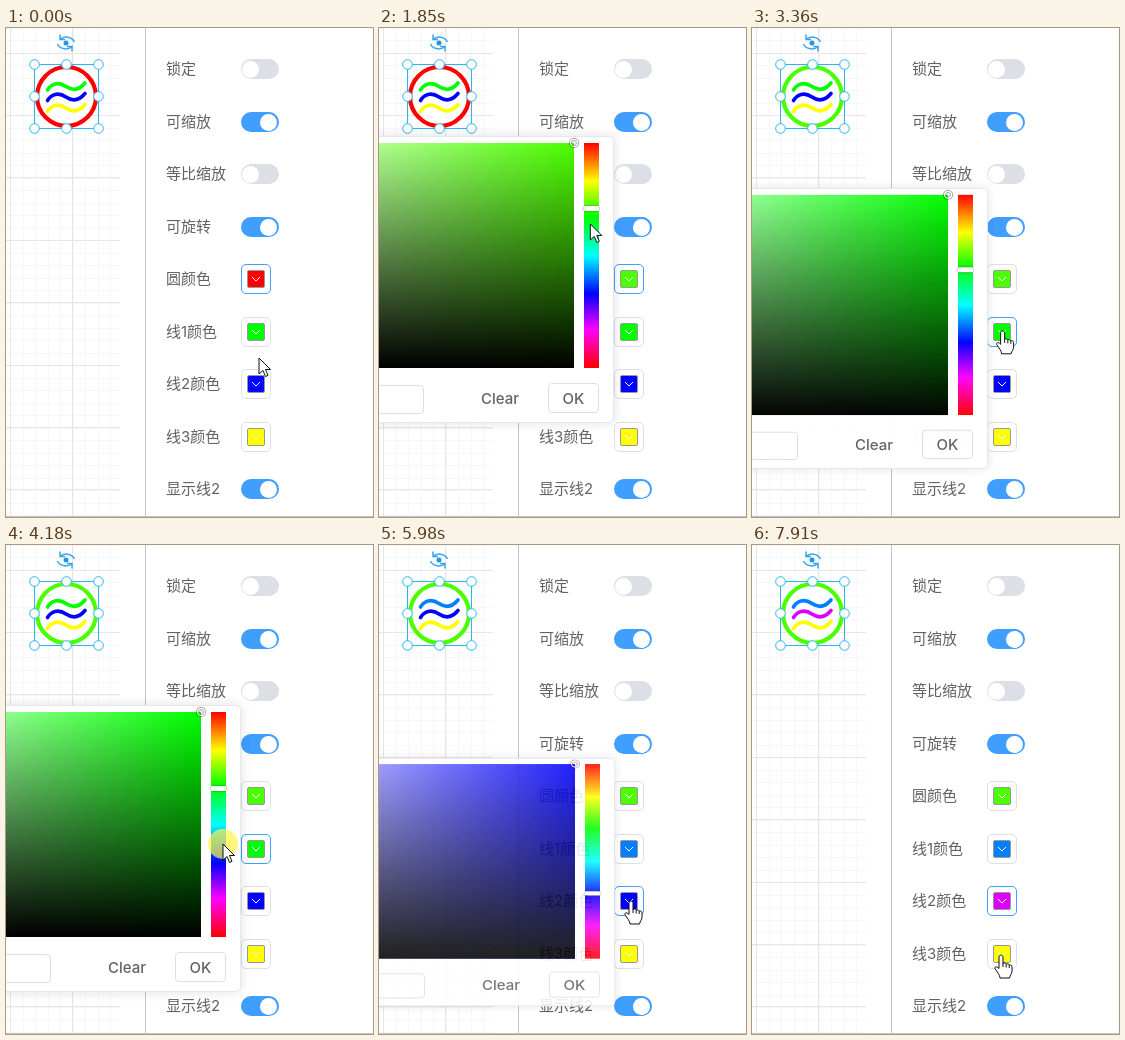
An HTML page for the animation above (8 s loop, 367 px wide and 489 px high).

```html
<!DOCTYPE html>
<html lang="zh">
<head>
<meta charset="utf-8">
<style>
  html, body { margin: 0; width: 100%; height: 100%; overflow: hidden; background: #fff; }
  #stage { position: relative; width: 367px; height: 489px; overflow: hidden;
    font: 15px/20px Inter, "Noto Sans CJK SC", "Noto Sans CJK", sans-serif; color: #606266; }
  #stage * { box-sizing: border-box; position: absolute; }
  svg { left: 0; top: 0; overflow: visible; }
  svg * { position: static; }
  .label { left: 160px; white-space: nowrap; }
  .switch { left: 235px; width: 38px; height: 20px; border-radius: 10px; background: #dcdfe6; }
  .switch::after { content: ""; position: absolute; left: 1px; top: 1.5px; width: 17px; height: 17px; border-radius: 50%; background: #fff; }
  .switch.on { background: #409eff; }
  .switch.on::after { left: 19px; }
  .swatch { left: 235px; width: 30px; height: 30px; border: 1px solid #dcdfe6; border-radius: 5px; background: #fff; }
  .swatch.focus { border-color: #409eff; }
  .swatch.ring { box-shadow: 0 0 0 1px #fff, 0 0 0 3px #409eff; }
  .swatch i { left: 5px; top: 5px; width: 18px; height: 18px; border: 1px solid #999; border-radius: 2px; }
  .swatch svg { left: 5px; top: 5px; }
  .popup { left: -161px; width: 396px; height: 287px; border: 1px solid #e4e7ed; border-radius: 5px;
    background: #fff; box-shadow: 0 0 12px rgba(0,0,0,.12); transform-origin: top; }
  .popup > * { margin: -1px; }
  .sv { left: 6px; top: 7px; width: 350px; height: 225px; }
  .dot { left: 352px; top: 3px; width: 8px; height: 8px; border: 1.5px solid #fff; border-radius: 50%;
    box-shadow: 0 0 1px 1px #0006, inset 0 0 1px 1px #0006; }
  .hue { left: 366px; top: 7px; width: 15px; height: 225px;
    background: linear-gradient(#f00, #ff0 17%, #0f0 33%, #0ff 50%, #00f 67%, #f0f 83%, #f00); }
  .thumb { left: 366px; width: 15px; height: 5px; background: #fff; border-radius: 1px; box-shadow: 0 0 2px #0009; }
  .input { left: 7px; top: 249px; width: 199px; height: 29px; border: 1px solid #dcdfe6; border-radius: 4px; }
  .clear, .ok { top: 247px; height: 30px; line-height: 32px; text-align: center; font-weight: 500; }
  .clear { left: 252px; width: 60px; }
  .ok { left: 330px; width: 51px; border: 1px solid #dcdfe6; border-radius: 4px; line-height: 30px; }
  .ok.hover { color: #409eff; border-color: #409eff; }
</style>
</head>
<body>
<div id="stage"></div>
<script>
const LOOP = 8000, SVG = 'http://www.w3.org/2000/svg';
const stage = document.getElementById('stage');

const rows = [
  ['锁定', false], ['可缩放', true], ['等比缩放', false], ['可旋转', true],
  ['圆颜色', 'red'], ['线1颜色', '#0f0'], ['线2颜色', '#00f'], ['线3颜色', '#ff0'], ['显示线2', true]
];
// Each picker opens, gets a new hue, and is confirmed with OK.
const pickers = [
  { top: 108, open: 663, pick: 1650, ok: 2430, from: 0, to: 102 },
  { top: 160, open: 3200, pick: 4245, ok: 5040, from: 120, to: 210 },
  { top: 213, open: 5882, pick: 6875, ok: 7620, from: 240, to: 292 }
];
const presses = [[570, 650], [1580, 1680], [2330, 2430], [3090, 3190], [4170, 4270],
  [4960, 5040], [5770, 5870], [6800, 6900], [7490, 7620]];
// time, x, y
const path = [
  [0, 253, 330], [520, 255, 250], [900, 255, 250], [1450, 213, 179], [1750, 213, 179],
  [2300, 194, 370], [2440, 194, 370], [2820, 264, 318], [3080, 252, 304], [3280, 252, 304],
  [3960, 217, 299], [4400, 217, 299], [4940, 194, 422], [5060, 194, 422], [5720, 252, 357],
  [6020, 252, 357], [6660, 210, 402], [7000, 210, 402], [7480, 194, 476], [7630, 194, 476],
  [7890, 249, 411], [8000, 249, 411]
];

function add(parent, cls, html = '', style = '') {
  const el = document.createElement('div');
  el.className = cls;
  el.innerHTML = html;
  el.style.cssText = style;
  parent.append(el);
  return el;
}
function addSvg(html) {
  const el = document.createElementNS(SVG, 'svg');
  el.setAttribute('width', 367);
  el.setAttribute('height', 489);
  el.innerHTML = html;
  stage.append(el);
  return el;
}

function gridLines(step, color) {
  let d = '';
  for (let x = 4.5; x < 114; x += step) d += `M${Math.floor(x) + .5} 0V488`;
  for (let y = 25 % step; y < 488; y += step) d += `M0 ${Math.floor(y) + .5}H114`;
  return `<path d="${d}" stroke="${color}"/>`;
}
const wave = (y, color) =>
  `<path class="part" d="M41.5 ${y}C45 ${y - 6} 52 ${y - 9} 60 ${y - 3.5}S74 ${y - 1} 79 ${y - 7}" stroke="${color}" stroke-width="3.6" stroke-linecap="round"/>`;
const handles = [28.5, 60.5, 92.5].flatMap(x => [36.5, 68.5, 100.5].map(y =>
  x === 60.5 && y === 68.5 ? '' : `<circle cx="${x}" cy="${y}" r="4.8" fill="#fff" stroke="#29b6f2"/>`)).join('');
const turn = '<path d="M54 6.5V11.5H59M54 11.5C58 7.5 66 8.5 68.5 14"/>';

const scene = addSvg(`<g fill="none">
  ${gridLines(12.5, '#f7f7f7')}${gridLines(62.4, '#e6e6e6')}
  <path d="M139.5 0V488M0 488.5H367" stroke="#c6c6c6"/>
  <circle class="part" cx="60.5" cy="68.5" r="29.5" fill="#fff" stroke="red" stroke-width="4.2"/>
  ${wave(62, '#0f0')}${wave(72.5, '#00f')}${wave(83.5, '#ff0')}
  <path d="M28.5 36.5H92.5V100.5H28.5Z" stroke="#29b6f2"/>${handles}
  <g stroke="#3aa5ee" stroke-width="1.5">${turn}<g transform="rotate(180 60 15)">${turn}</g></g>
  <circle cx="60" cy="15" r="2.5" fill="#1e96ea"/></g>`);
const parts = scene.querySelectorAll('.part');

const swatches = [];
rows.forEach(([text, value], i) => {
  const y = 41 + i * 52.5;
  add(stage, 'label', text, `top:${y - 10}px`);
  if (typeof value === 'boolean') {
    add(stage, value ? 'switch on' : 'switch', '', `top:${Math.round(y - 10)}px`);
  } else {
    swatches.push(add(stage, 'swatch', `<i style="background:${value}"></i>
      <svg width="18" height="18"><path d="M5 7L9 11L13 7" fill="none" stroke="#fff"/></svg>`,
      `top:${Math.round(y - 15)}px`));
  }
});

for (const p of pickers) {
  p.el = add(stage, 'popup', '', `top:${p.top}px`);
  p.sv = add(p.el, 'sv');
  add(p.el, 'dot');
  add(p.el, 'hue');
  p.thumb = add(p.el, 'thumb');
  add(p.el, 'input');
  add(p.el, 'clear', 'Clear');
  p.button = add(p.el, 'ok', 'OK');
}

const pointer = addSvg(`<circle r="15" fill="#fff545" fill-opacity=".7"/>
  <g fill="#fff" stroke="#111" stroke-linejoin="round">
  <path d="M0 0V16L4 12.5L6.5 18.5L9 17.4L6.5 11.5H11.5Z"/>
  <path d="M-2 1C-2-1.5 2-1.5 2 1V8C2 6.5 5 6.5 5.2 8.5C6 7.4 8 7.6 8.2 9.3C9 8.4 11 9 11 10.8V15C11 18 9 19 8.5 22H-1C-1 19-4 16-6 12.5C-6.5 10.5-4 10-2 12.5ZM2 8V11M5.2 8.5V11.5M8.2 9.3V12"/></g>`);
const halo = pointer.querySelector('circle');
const [arrow, hand] = pointer.querySelectorAll('path');

const clamp = v => Math.min(1, Math.max(0, v));
const easeOut = v => 1 - (1 - clamp(v)) ** 5;
const smooth = v => v * v * (3 - 2 * v);
const show = (el, on) => { el.style.display = on ? '' : 'none'; };
const hsl = h => `hsl(${h} 100% 50%)`;

function pointerAt(t) {
  const i = Math.max(1, path.findIndex(p => p[0] > t));
  const [t0, x0, y0] = path[i - 1], [t1, x1, y1] = path[i];
  const k = smooth((t - t0) / (t1 - t0));
  return [x0 + (x1 - x0) * k, y0 + (y1 - y0) * k];
}

function render(t) {
  const [x, y] = pointerAt(t);
  let over = swatches.some(s => x > 235 && x < 265 && y > s.offsetTop && y < s.offsetTop + 28);
  const focus = t < pickers[1].open ? 0 : t < pickers[2].open ? 1 : 2;
  swatches.forEach((s, i) => s.classList.toggle('focus', i === focus));
  swatches[0].classList.toggle('ring', t > pickers[0].open && t < 1050);

  pickers.forEach((p, i) => {
    const scale = t < p.ok ? easeOut((t - p.open) / 300) : 1 - easeOut((t - p.ok) / 300);
    const hue = t < p.pick ? p.from : p.to;
    const shift = scale < .995 && t < p.ok ? 1 : 0;
    show(p.el, scale > 0);
    p.el.style.opacity = scale;
    p.el.style.transform = `translateX(${shift}px) scaleY(${scale})`;
    p.sv.style.background = `linear-gradient(transparent, #000), linear-gradient(90deg, #fff, ${hsl(hue)})`;
    p.thumb.style.top = 7 + hue / 360 * 221 + 'px';
    swatches[i].firstChild.style.background = hsl(hue);
    parts[i].setAttribute('stroke', hsl(t < p.ok ? p.from : p.to));
    const onOk = scale > .5 && x > 169 && x < 220 && y > p.top + 247 && y < p.top + 277;
    p.button.classList.toggle('hover', onOk);
    over = over || onOk;
  });

  pointer.style.transform = `translate(${x}px, ${y}px)`;
  show(arrow, !over);
  show(hand, over);
  show(halo, presses.some(([a, b]) => t >= a && t < b));
}

const start = performance.now();
function tick(now) {
  render(Math.max(0, now - start) % LOOP);
  requestAnimationFrame(tick);
}
render(0);
requestAnimationFrame(tick);
</script>
</body>
</html>
```
